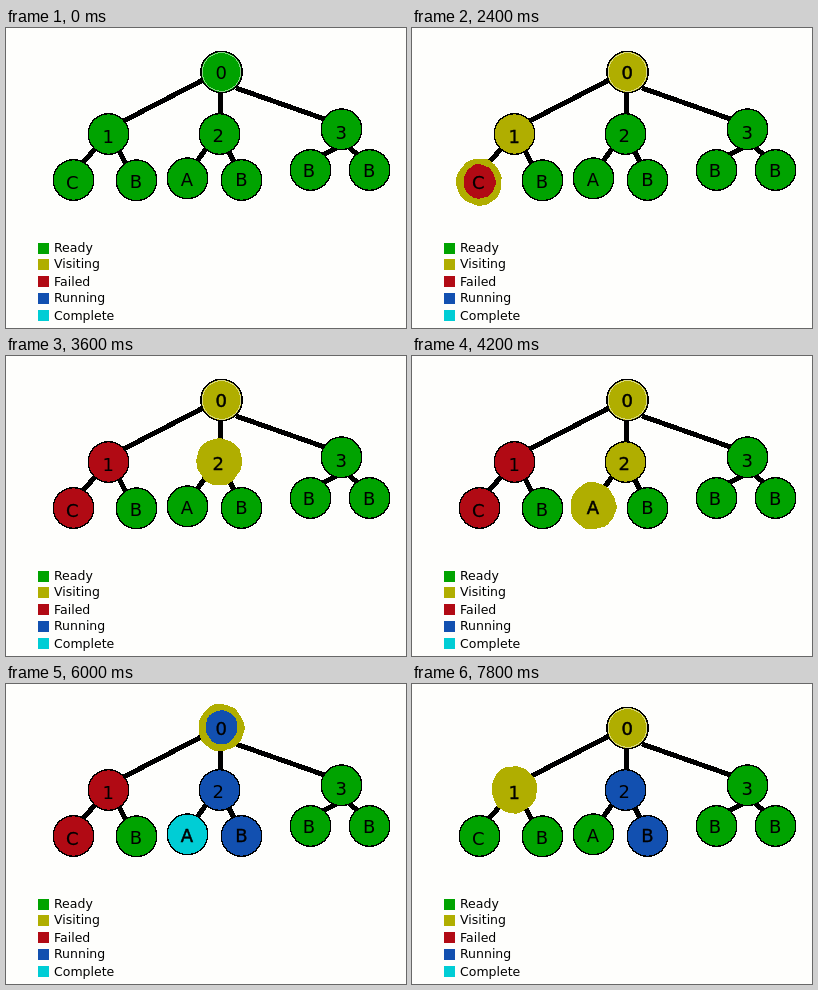
Animation, 400 px wide and 300 px high, one loop 8000 ms. Source, as an HTML page:

```html
<!DOCTYPE html>
<html lang="en">
<head>
<meta charset="utf-8">
<title>Behaviour tree</title>
<style>
:root {
  --ready: #00a300; --visiting: #b0ae00; --failed: #b10a14;
  --running: #1250b0; --complete: #00cdd5; --paper: #fefefc;
}
html, body { margin: 0; width: 100%; height: 100%; overflow: hidden; background: var(--paper); }
svg { display: block; width: 100%; height: 100%; shape-rendering: crispEdges; }
text { font-family: "DejaVu Sans", sans-serif; }
.edges { stroke: #000; stroke-width: 5; fill: none; }
.node {
  --fill: var(--ready); --blob: transparent; --core: transparent; --bold: 0;
  animation: 8s step-end infinite;
}
.disc { fill: var(--fill); stroke: #000; stroke-width: 1.4; }
.halo { fill: none; stroke: var(--paper); stroke-opacity: .6; stroke-width: .9; }
.blob { fill: var(--blob); }
.core { fill: var(--core); }
.node text { font-size: 18px; text-anchor: middle; stroke: #000; stroke-width: var(--bold); }
.legend text { font-size: 12.5px; }

/* Each step is 600 ms, or 7.5 % of the loop. */
#root { animation-name: root; }
#one { animation-name: one; }
#oneC { animation-name: oneC; }
#two { animation-name: two; }
#twoA { animation-name: twoA; }
#twoB { animation-name: twoB; }

@keyframes root {
  0%, 82.5% { --fill: var(--ready); --blob: transparent; --core: transparent; --bold: 0; }
  7.5%, 90% { --fill: var(--visiting); --blob: var(--visiting); --core: transparent; --bold: .5; }
  15%, 97.5% { --fill: var(--visiting); --blob: transparent; --core: transparent; --bold: .5; }
  75% { --fill: var(--visiting); --blob: var(--visiting); --core: var(--running); --bold: .3; }
}
@keyframes one {
  0%, 82.5% { --fill: var(--ready); --blob: transparent; --core: transparent; --bold: 0; }
  15%, 97.5% { --fill: var(--visiting); --blob: var(--visiting); --core: transparent; --bold: .3; }
  22.5% { --fill: var(--visiting); --blob: transparent; --core: transparent; --bold: .3; }
  37.5% { --fill: var(--visiting); --blob: var(--visiting); --core: var(--failed); --bold: 0; }
  45% { --fill: var(--failed); --blob: transparent; --core: transparent; --bold: 0; }
}
@keyframes oneC {
  0%, 82.5% { --fill: var(--ready); --blob: transparent; --core: transparent; --bold: 0; }
  22.5% { --fill: var(--visiting); --blob: var(--visiting); --core: transparent; --bold: .3; }
  30% { --fill: var(--visiting); --blob: var(--visiting); --core: var(--failed); --bold: .3; }
  37.5% { --fill: var(--failed); --blob: transparent; --core: transparent; --bold: .3; }
}
@keyframes two {
  0% { --fill: var(--ready); --blob: transparent; --core: transparent; --bold: 0; }
  45% { --fill: var(--visiting); --blob: var(--visiting); --core: transparent; --bold: .3; }
  52.5% { --fill: var(--visiting); --blob: transparent; --core: transparent; --bold: .3; }
  67.5% { --fill: var(--visiting); --blob: var(--visiting); --core: var(--running); --bold: 0; }
  75%, 100% { --fill: var(--running); --blob: transparent; --core: transparent; --bold: 0; }
}
@keyframes twoA {
  0%, 82.5% { --fill: var(--ready); --blob: transparent; --bold: 0; }
  52.5% { --fill: var(--visiting); --blob: var(--visiting); --bold: .5; }
  60% { --fill: var(--complete); --blob: transparent; --bold: .5; }
}
@keyframes twoB {
  0% { --fill: var(--ready); --blob: transparent; --bold: 0; }
  60% { --fill: var(--visiting); --blob: var(--visiting); --bold: .3; }
  67.5%, 100% { --fill: var(--running); --blob: transparent; --bold: .3; }
}
</style>
</head>
<body>
<svg viewBox="0 0 400 300">
  <path class="edges" d="M197 52L117 93.3M214.5 64V88M230 60L319 91.2M89 121L76 135.5M113 122L120 137M201 119.5L191.500 132.500M222 122L228 134M331 119.500L317 127M343 119.500L353 127.7"/>
  <g id="tree"></g>
  <g id="legend" class="legend"></g>
</svg>
<script>
const nodes = [
  // id, label, centre x, centre y, label x, baseline
  ["root", "0", 215.5, 44, 215.3, 51],
  ["one", "1", 102.5, 106, 102.2, 115],
  ["two", "2", 213.5, 106, 212.3, 114],
  ["three", "3", 335.5, 101.3, 335.3, 111],
  ["oneC", "C", 67.5, 152, 66.3, 161],
  ["oneB", "B", 130.5, 152.3, 130, 160],
  ["twoA", "A", 181.5, 150.3, 181, 158],
  ["twoB", "B", 235.5, 152, 235.4, 158],
  ["threeB1", "B", 304.5, 142, 303, 149],
  ["threeB2", "B", 363.5, 142, 363.2, 149]
];

// Hand-painted, slightly uneven oval.
function wobbly(cx, cy, rx, ry, phase) {
  const points = [];
  for (let i = 0; i < 72; i++) {
    const a = i * Math.PI / 36;
    const k = 1 + .016 * Math.sin(3 * a + phase) + .014 * Math.sin(7 * a + 2 * phase)
                + .008 * Math.sin(13 * a + phase);
    points.push((cx + rx * k * Math.cos(a)).toFixed(1) + " " + (cy + ry * k * Math.sin(a)).toFixed(1));
  }
  return "M" + points.join("L") + "Z";
}

document.getElementById("tree").innerHTML = nodes.map(([id, label, x, y, tx, ty], i) => {
  const isRoot = id === "root";
  const by = id === "oneC" ? y + 2 : y - .3;
  return `<g id="${id}" class="node">
    <circle class="disc" cx="${x}" cy="${y}" r="${isRoot ? 20.7 : 20.3}"/>
    ${isRoot ? `<circle class="halo" cx="${x}" cy="${y}" r="19.3"/>` : ""}
    <path class="blob" d="${wobbly(x - .3, by, 22.8, 23.6, i + 1)}"/>
    <path class="core" d="${wobbly(x, by - .4, 15.9, 17.1, i + 3)}"/>
    <text x="${tx}" y="${ty}">${label}</text>
  </g>`;
}).join("");

const legend = [["Ready", 215, 224], ["Visiting", 231, 240], ["Failed", 248, 258],
                ["Running", 265, 274], ["Complete", 282, 292]];
document.getElementById("legend").innerHTML = legend.map(([name, y, base]) =>
  `<rect x="32" y="${y}" width="11" height="11" style="fill:var(--${name.toLowerCase()})"/>
   <text x="48" y="${base}">${name}</text>`).join("");
</script>
</body>
</html>
```
